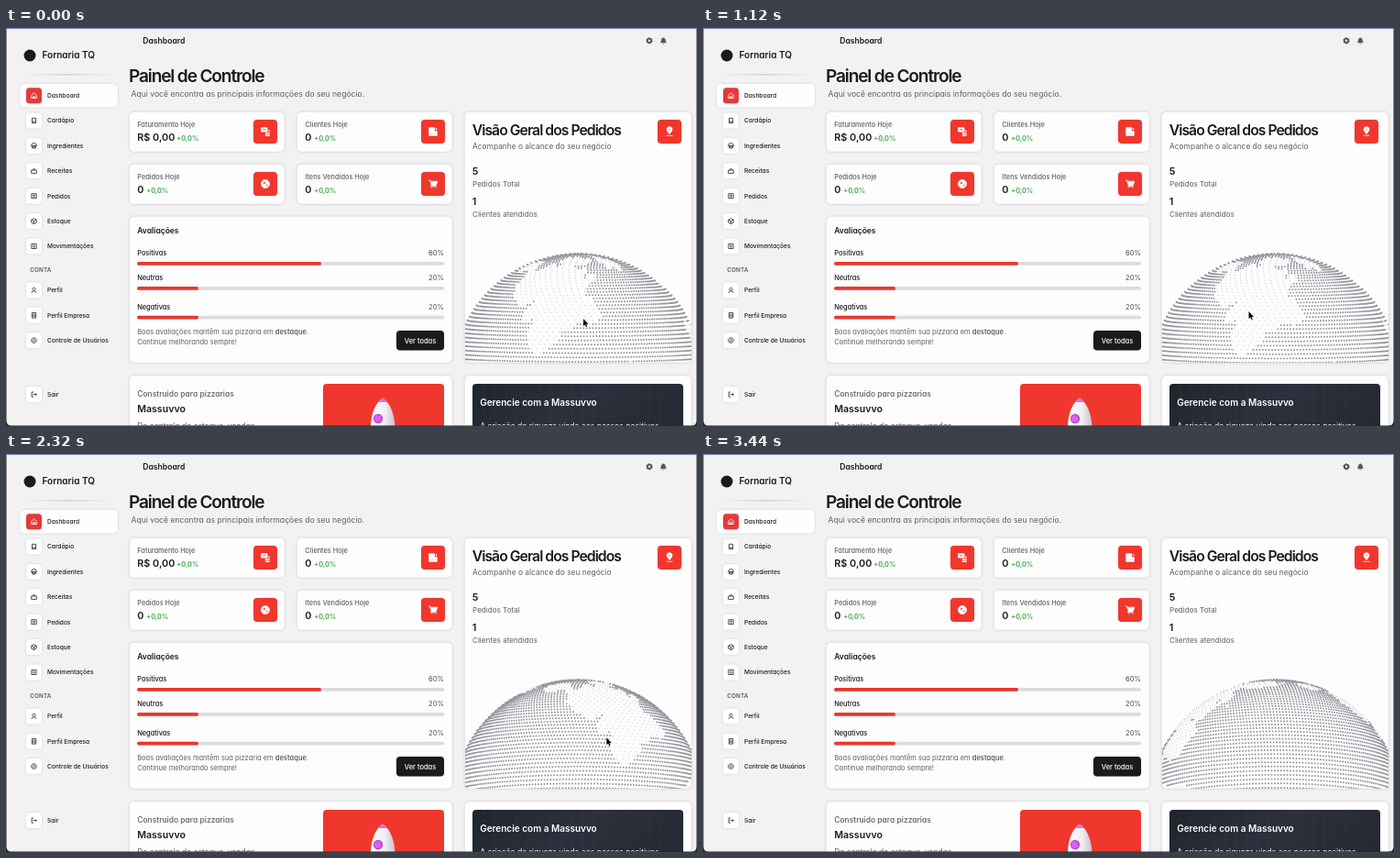
These frames come from a looping animation (754 by 434 pixels, 3.52 s). An HTML page with a canvas:

```html
<!DOCTYPE html>
<html lang="pt-BR">
<head>
<meta charset="utf-8">
<title>Painel de Controle</title>
<style>
html, body { margin: 0; width: 100%; height: 100%; overflow: hidden; background: #f2f2f3; }
svg, canvas { position: absolute; left: 0; top: 0; width: 754px; height: 434px; }
text { font-family: Inter, "Open Sans", sans-serif; white-space: pre; }
.round { font-feature-settings: "cv11"; }
.shadow { filter: drop-shadow(0 .7px .9px rgba(0, 0, 0, .14)); }
</style>
</head>
<body>
<svg id="ui" viewBox="0 0 754 434">
  <defs>
    <linearGradient id="rule">
      <stop offset="0" stop-color="#bbb" stop-opacity="0"/>
      <stop offset=".5" stop-color="#b5b5b5"/>
      <stop offset="1" stop-color="#bbb" stop-opacity="0"/>
    </linearGradient>
    <linearGradient id="night" x2="1" y2=".3">
      <stop offset="0" stop-color="#20242c"/>
      <stop offset=".55" stop-color="#2b313c"/>
      <stop offset="1" stop-color="#252a33"/>
    </linearGradient>
    <linearGradient id="hull">
      <stop offset="0" stop-color="#fff"/>
      <stop offset=".6" stop-color="#f1edf3"/>
      <stop offset="1" stop-color="#c9c1cd"/>
    </linearGradient>
  </defs>
</svg>
<canvas id="stage"></canvas>
<script>
const RED = '#f0372d', INK = '#1b1b1e', GREY = '#606065';
const ui = document.getElementById('ui');

function add(tag, attrs, parent = ui) {
  const el = document.createElementNS('http://www.w3.org/2000/svg', tag);
  for (const k in attrs) el.setAttribute(k, attrs[k]);
  return parent.appendChild(el);
}

function rect(x, y, width, height, rx, fill, more) {
  return add('rect', { x, y, width, height, rx, fill, ...more });
}

function label(str, x, y, size, weight = 400, fill = INK, more) {
  const el = add('text', { x, y, 'font-size': size, 'font-weight': weight, fill, ...more });
  el.textContent = str;
  return el;
}

const round = { class: 'round' };

function icon(d, x, y, color, width = .8, fill = 'none') {
  add('path', {
    d, fill, stroke: color, 'stroke-width': width, 'fill-rule': 'evenodd',
    'stroke-linejoin': 'round', transform: `translate(${x} ${y})`
  });
}

function card(x, y, w, h) {
  rect(x, y, w, h, 5, '#fdfdfd', { class: 'shadow', stroke: '#e4e4e6', 'stroke-width': .6 });
}

function redTile(x, y, d) {
  rect(x, y, 26, 26, 4, RED, { class: 'shadow' });
  icon(d, x + 13, y + 13, '#fff', .8, '#fff');
}

// Header and brand
rect(0, 0, 754, 434, 0, '#f2f2f3');
add('circle', { cx: 26, cy: 30, r: 6.5, fill: INK });
label('Fornaria TQ', 39.5, 32.6, 10, 600, INK, round);
rect(17, 50.5, 102, .8, 0, 'url(#rule)');
label('Dashboard', 149.3, 17.2, 8.6, 600, INK, round);
label('Painel de Controle', 134, 59.3, 19.1, 600, INK, { 'letter-spacing': '-.06em' });
label('Aqui você encontra as principais informações do seu negócio.', 136.5, 74.8, 8.6, 400, GREY, round);
add('circle', { cx: 702, cy: 13.8, r: 2.2, fill: 'none', stroke: '#56565a', 'stroke-width': 1.9 });
add('circle', { cx: 702, cy: 13.8, r: 3.2, fill: 'none', stroke: '#56565a', 'stroke-width': 1, 'stroke-dasharray': '1.7 1.65' });
icon('M-3 2Q-2.2 1-2.2-1Q-2-3 0-3.3Q2-3 2.2-1Q2.2 1 3 2ZM-.8 3.2H.8', 717.3, 14, '#56565a', .5, '#56565a');

// Sidebar
const menu = [
  ['Dashboard', 73.7, 'M-2.8-.4L0-2.8L2.8-.4V2.8H-2.8ZM-.8 2.8V.8H.8V2.8'],
  ['Cardápio', 101, 'M-2-2.7H2V2.7H-2ZM-2 1.2H2'],
  ['Ingredientes', 128.4, 'M-3 0Q-2.5-3 0-3Q2.5-3 3 0ZM-2.3 .2L-1.6 2.6H1.6L2.3 .2M-.8 0V2.4M.8 0V2.4'],
  ['Receitas', 155.8, 'M-2.8-.8H2.8V2.6H-2.8ZM-1.6-.8L0-2.8L1.6-.8'],
  ['Pedidos', 183.2, 'M-2.7-2.5H2.7V2.5H-2.7ZM-1.4-.8H1.4M-1.4 .8H1.4'],
  ['Estoque', 210.6, 'M0-3L2.7-1.5V1.5L0 3L-2.7 1.5V-1.5ZM-2.7-1.5L0 0L2.7-1.5M0 0V3'],
  ['Movimentações', 237.9, 'M-2.6-2.6H2.6V2.6H-2.6ZM-1.4-.8H1.2M-1.2 .9H1.4'],
  ['Perfil', 286, 'M0-2.8A1.5 1.5 0 1 1-.1-2.8ZM-2.6 2.8Q-2.2 .8 0 .8Q2.2 .8 2.6 2.8'],
  ['Perfil Empresa', 313.3, 'M-2.2-2.8H2.2V2.8H-2.2ZM-.8-1.6V1.8M.8-1.6V1.8'],
  ['Controle de Usuários', 340.6, 'M0-2.8A2.8 2.8 0 1 1-.1-2.8ZM0-1.1A1.1 1.1 0 1 1-.1-1.1Z'],
  ['Sair', 399.6, 'M-.5-2.6H-2.4V2.6H-.5M-1 0H2.8M1.5-1.2L2.8 0L1.5 1.2']
];
rect(15, 61, 107, 25.5, 5, '#fefefe', { class: 'shadow' });
menu.forEach(([name, y, d], i) => {
  rect(22, y - 8.5, 17, 17, 3.5, i ? '#fefefe' : '#e5393a', { class: 'shadow' });
  icon(d, 30.5, y, i ? '#303034' : '#fff', .85);
  label(name, 45, y + 2.3, 6.6, 500, INK, round);
});
label('CONTA', 26.2, 266.4, 6.3, 600, '#5c5c60', { 'letter-spacing': '.2' });

// Small cards
const stats = [
  ['Faturamento Hoje', 'R$ 0,00', 134.5, 91.5, 'M-4.5-4.2H2V0H-4.5ZM-3.2-3V-1.2H.8V-3ZM0 1.5H4.5V2.2H0ZM0 3.8H4.5V4.5H0ZM3-1H4.500V-.5H3Z'],
  ['Clientes Hoje', '0', 317.5, 91.5, 'M-4.3-4.3H1.5V-.5H4.3V4.3H-4.3ZM-3 2.2H3V3H-3ZM2.500-3H4.500M3.5-4V-2'],
  ['Pedidos Hoje', '0', 134.5, 148.5, 'M0-4.5A4.5 4.5 0 1 1-.1-4.5ZM-3-1.500L-.5-2.5L.5-1L-1.500 1ZM1 .5L3.3 0L2 3L.5 2.5Z'],
  ['Itens Vendidos Hoje', '0', 317.5, 148.5, 'M-3-2.8H4.8L3.3 1.4H-1.8ZM-5-4H-3.4L-3-2.8M-1.8 1.4L-2.5 2.8H4M-1.6 4.2H-.8M2.7 4.2H3.5']
];
for (const [name, value, x, y, d] of stats) {
  card(x, y, 169.5, 43.5);
  label(name, x + 8.8, y + 16.8, 7.35, 500, GREY, round);
  label(value, x + 8.8, y + 31, 10.8, 600);
  label('+0,0%', x + (value === '0' ? 18.7 : 51.8), y + 31.2, 7.4, 600, '#3fa647');
  redTile(x + 135.5, y + 8.5, d);
}

// Ratings
card(134.5, 205.5, 352.5, 159.5);
label('Avaliações', 143.2, 223.5, 8.5, 600, INK, round);
[['Positivas', 60, 248, 255], ['Neutras', 20, 275.2, 282], ['Negativas', 20, 306.6, 313.7]].forEach(([name, part, y, bar]) => {
  label(name, 143.2, y, 7.4, 500, INK, round);
  label(part + '%', 478, y, 7.6, 400, '#4c4c50', { 'text-anchor': 'end' });
  rect(143, bar, 335, 3.8, 1.9, '#dcdcde');
  rect(143, bar, 3.35 * part, 3.8, 1.9, '#e9382f');
});
const note = label('Boas avaliações mantêm sua pizzaria em ', 143.2, 333.7, 7.5, 400, GREY, round);
add('tspan', { 'font-weight': 600 }, note).textContent = 'destaque';
note.append('.');
label('Continue melhorando sempre!', 143.2, 345, 7.6, 400, GREY, round);
rect(426, 330, 52, 21.5, 4, INK, { class: 'shadow' });
label('Ver todas', 452, 343.6, 7.5, 500, '#fff', { class: 'round', 'text-anchor': 'middle' });

// Orders overview
card(500.5, 91.5, 247.5, 273.5);
label('Visão Geral dos Pedidos', 508.8, 117.2, 15.7, 600, INK, { 'letter-spacing': '-.06em' });
label('Acompanhe o alcance do seu negócio', 509, 131.8, 8.4, 400, GREY);
redTile(711, 100, 'M0 2.5Q-3-1-3-2.3A3 3 0 0 1 3-2.3Q3-1 0 2.5ZM0-3.3A1 1 0 1 1-.1-3.3ZM-3.5 4.3H3.5');
label('5', 508.8, 160.2, 10.8, 600);
label('Pedidos Total', 509, 173.2, 8.1, 400, GREY);
label('1', 508.8, 192.8, 10.8, 600);
label('Clientes atendidos', 509, 205.8, 8.1, 400, GREY);

// Bottom cards
card(134.5, 379, 352.5, 70);
label('Construido para pizzarias', 143.2, 401.8, 8.5, 500, GREY, round);
label('Massuvvo', 143.2, 419, 10.6, 600, INK);
label('Do controle de estoque, vendas,', 143.2, 436.6, 8.5, 400, GREY, round);
rect(346, 388, 132, 60, 4, RED);
add('path', { d: 'M411 403.5Q399 412 398 434H424.5Q423 412 411 403.5Z', fill: 'url(#hull)' });
add('path', { d: 'M411 403.5Q408 405.5 406 408H416Q414 405.5 411 403.5Z', fill: '#d873e6' });
add('circle', { cx: 406, cy: 426, r: 5.2, fill: '#b04bd0' });
add('circle', { cx: 405.6, cy: 426, r: 3.8, fill: '#e05cf0' });
card(500.5, 379, 247.5, 70);
rect(509, 388, 230, 60, 4, 'url(#night)');
for (let x = 520; x < 736; x += 12) rect(x, 388, 3, 46, 0, '#fff', { opacity: .012 });
label('Gerencie com a Massuvvo', 517.2, 411.6, 10, 600, '#fff');
label('A criação de riqueza vinda aos passos positivos', 517.2, 437.2, 8.6, 400, '#fff');

// Window edge
add('path', { d: 'M0 0H754V434H0ZM.5 .5V428Q.5 433.5 6 433.5H748Q753.5 433.5 753.5 428V.5Z', 'fill-rule': 'evenodd', fill: '#26262c' });
rect(0, 0, 754, 1, 0, '#7d7dba');

// Globe
const LOOP = 3520, STEP = 80, RAD = Math.PI / 180;
const CX = 624.5, CY = 383, R = 137;
const canvas = document.getElementById('stage');
const dpr = window.devicePixelRatio || 1;
canvas.width = 754 * dpr;
canvas.height = 434 * dpr;
const ctx = canvas.getContext('2d');

// Land as ellipses: longitude, latitude, half width, half height
const land = [
  [-105, 53, 31, 16], [-95, 36, 21, 11], [-102, 22, 8, 8], [-150, 65, 16, 6], [-90, 73, 24, 6],
  [-42, 72, 14, 10], [-60, -7, 18, 15], [-66, -32, 9, 20], [10, 17, 26, 15], [25, -12, 14, 21],
  [20, 52, 23, 12], [85, 52, 50, 20], [78, 20, 9, 12], [108, 28, 15, 12], [140, 66, 38, 7],
  [112, -1, 14, 5], [134, -25, 18, 11]
];

function isLand(lon, lat) {
  const rough = 1 + .2 * Math.sin(lon * .31 + lat * .2) + .16 * Math.sin(lat * .53 - lon * .47);
  return land.some(([x, y, w, h]) => {
    const dx = (lon - x + 540) % 360 - 180;
    return (dx / w) ** 2 + ((lat - y) / h) ** 2 < rough;
  });
}

const dots = [];
for (let lat = -60; lat < 89; lat += 2) {
  const count = Math.round(250 * Math.cos(lat * RAD));
  for (let i = 0; i < count; i++) {
    const lon = i / count * 360 - 180, dry = isLand(lon, lat);
    if (dry && i % 2) continue;
    dots.push({ lon: lon * RAD, y: Math.sin(lat * RAD), c: Math.cos(lat * RAD), r: dry ? .45 : .98 });
  }
}

// Keys: time, longitude, tilt
const view = [
  [0, -85, 2], [480, -97, -3], [800, -163, -9], [1440, -14, 14],
  [2000, -90, -3], [2720, -178, -10], [3000, -188, -10], [3520, -190, -10]
];
// Keys: time, x, y
const pointer = [
  [0, 630, 317], [480, 641, 306], [640, 680, 314], [800, 610, 333], [1440, 581, 285],
  [2000, 652, 296], [2720, 660, 328], [2960, 668, 328], [3360, 456, 2], [3440, 440, -20], [3520, 440, -20]
];

function at(keys, t) {
  const i = keys.findIndex(k => k[0] > t);
  const a = keys[i - 1], b = keys[i];
  const u = (t - a[0]) / (b[0] - a[0]), e = u * u * (3 - 2 * u);
  return [1, 2].map(n => a[n] + (b[n] - a[n]) * e);
}

function drawGlobe(lon, tilt) {
  const s = Math.sin(tilt * RAD), c = Math.cos(tilt * RAD);
  ctx.save();
  ctx.beginPath();
  ctx.rect(501, 240, 247, 125);
  ctx.clip();
  ctx.fillStyle = '#95959e';
  ctx.beginPath();
  for (const d of dots) {
    const a = d.lon - lon * RAD, q = d.c * Math.cos(a);
    if (d.y * s + q * c < 0) continue;
    const x = CX + R * d.c * Math.sin(a), y = CY - R * (d.y * c - q * s);
    if (y > 367 || x < 499 || x > 750) continue;
    ctx.moveTo(x + d.r, y);
    ctx.arc(x, y, d.r, 0, 2 * Math.PI);
  }
  ctx.fill();
  ctx.restore();
}

function drawPointer(x, y) {
  const arrow = new Path2D('M0 0V8L1.8 6.4L3 9.1L4.3 8.5L3.1 5.9H5.5Z');
  ctx.save();
  ctx.translate(x, y);
  ctx.lineWidth = 1.3;
  ctx.strokeStyle = '#fff';
  ctx.stroke(arrow);
  ctx.fillStyle = '#000';
  ctx.fill(arrow);
  ctx.restore();
}

const start = performance.now();
function frame() {
  const t = Math.floor((performance.now() - start) % LOOP / STEP) * STEP;
  ctx.setTransform(dpr, 0, 0, dpr, 0, 0);
  ctx.clearRect(0, 0, 754, 434);
  drawGlobe(...at(view, t));
  drawPointer(...at(pointer, t));
  requestAnimationFrame(frame);
}
frame();
</script>
</body>
</html>
```
